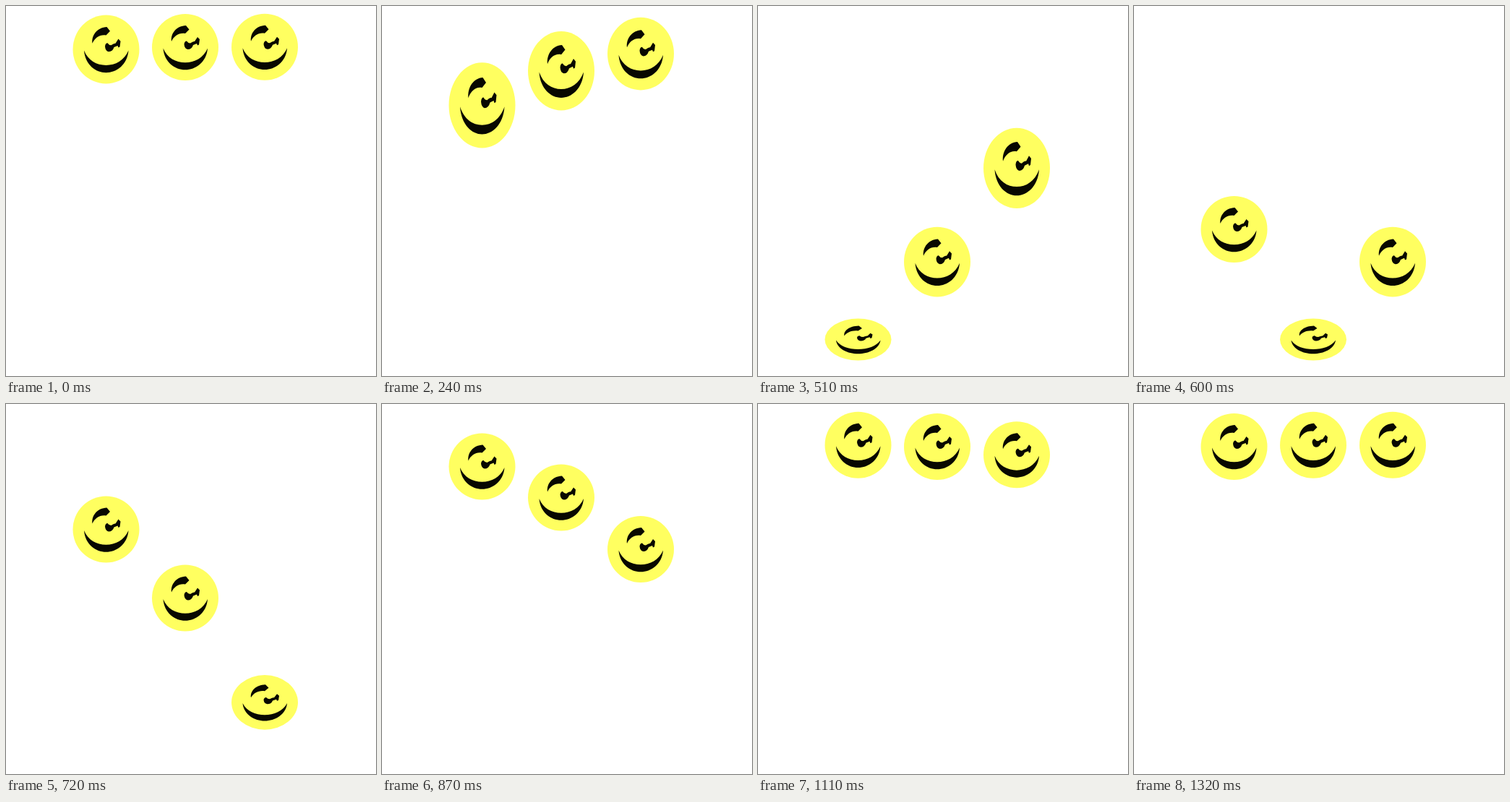
Animation of 512x512 px, one loop 1350 ms. Source, as an HTML page with a canvas:

```html
<!DOCTYPE html>
<html>
<head>
<meta charset="utf-8">
<style>
  html, body { margin: 0; width: 100%; height: 100%; overflow: hidden; background: #fff; }
  canvas { display: block; }
</style>
</head>
<body>
<canvas id="stage" width="512" height="512"></canvas>
<script>
const ctx = document.getElementById('stage').getContext('2d');
const LOOP = 1350, STEP = 30, DELAY = 90;
const RADIUS = 46, TOP = 102.8, GROUND = 490.5;
const YELLOW = '#ffff60', BLACK = '#080800';
const COLUMNS = [138.5, 248, 358];

// Height scale over time: stretch while falling, squash on impact, recover.
const STRETCH = [[-30, 1], [270, 1.315], [450, 1], [510, 0.63], [568, 1]];

const mouth = new Path2D('M-30.5 1.5 C-29 21 -14 31.3 0 31.3 C14 31.3 29.5 21 31 1.5 C25 15 13 21.3 0 21.3 C-13 21.3 -25 15 -30.5 1.5Z');
const brow = new Path2D('M-19 -8 C-20.5 -19 -12 -29.5 1 -30 L5.5 -24.5 L0 -19 C-8 -20.5 -15.5 -16 -19 -8Z');
const wink = new Path2D('M-1.5 -4 Q-1 -8.5 2 -8.5 Q4 -5.5 7 -5.5 Q11 -8.5 13 -8 L17 -14 L20 -11 L19 -3.5 L17 -2.5 L16 -5 L11 -3 Q9 3 3.5 3 Q-1 2 -1.5 -4Z');

function stretchAt(t) {
  for (let i = 1; i < STRETCH.length; i++) {
    const [t0, a] = STRETCH[i - 1], [t1, b] = STRETCH[i];
    if (t >= t0 && t < t1) return a + (b - a) * (t - t0) / (t1 - t0);
  }
  return 1;
}

// Lower edge of a ball: cubic fall, short rest on the ground, cubic rise.
function bottomAt(t) {
  const drop = t < 495
    ? 0.01195 * Math.max(0, t + 140)
    : 0.01192 * Math.max(0, 1130 - t);
  return Math.min(GROUND, TOP + drop ** 3);
}

function drawBall(x, time) {
  const t = (time + 180 + LOOP) % LOOP - 180;
  const scale = stretchAt(t);
  ctx.save();
  ctx.translate(x, bottomAt(t) - RADIUS * scale);
  ctx.scale(1, scale);
  ctx.fillStyle = YELLOW;
  ctx.beginPath();
  ctx.arc(0, 0, RADIUS, 0, 2 * Math.PI);
  ctx.fill();
  ctx.fillStyle = BLACK;
  for (const part of [mouth, brow, wink]) ctx.fill(part);
  ctx.restore();
}

function render() {
  const time = Math.floor(performance.now() % LOOP / STEP) * STEP;
  ctx.fillStyle = '#fff';
  ctx.fillRect(0, 0, 512, 512);
  COLUMNS.forEach((x, i) => drawBall(x, time - i * DELAY));
  requestAnimationFrame(render);
}
render();
</script>
</body>
</html>
```
